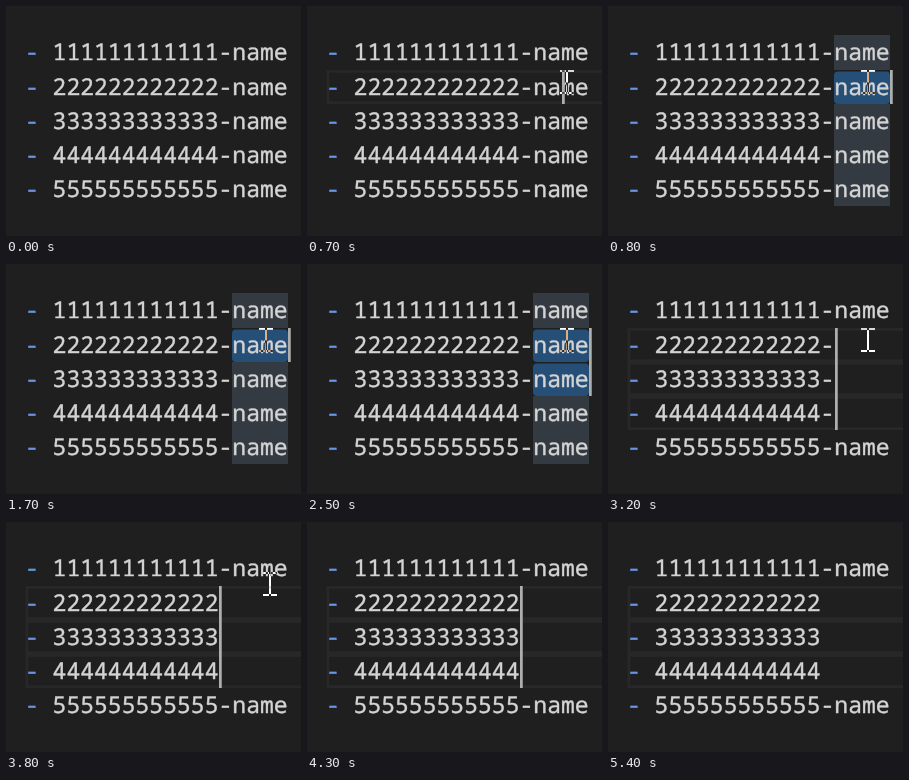
Recreate the animation shown at these times as an HTML page. Size 295 px wide and 230 px high, loop 5500 ms.

```html
<!DOCTYPE html>
<html lang="en">
<head>
<meta charset="utf-8">
<title>Multi-cursor editing</title>
<style>
  html, body { margin: 0; width: 100%; height: 100%; overflow: hidden; background: #1f1f1f; }
  svg { display: block; width: 295px; height: 230px; isolation: isolate; }
  text {
    font: 23.05px "Noto Sans Mono", "DejaVu Sans Mono", monospace;
    white-space: pre; text-rendering: geometricPrecision; stroke-width: .4;
  }
  .item { fill: #d4d4d4; stroke: #d4d4d4; }
  .bullet { fill: #6796e6; stroke: #6796e6; }
  .line { fill: none; stroke: #282828; stroke-width: 2.7; }
  .match { fill: #343a41; }
  .selection { fill: #264f78; }
  .caret { fill: #aeafad; }
  .mouse { fill: #fff; mix-blend-mode: difference; }
</style>
</head>
<body>
<svg id="stage" viewBox="0 0 295 230"></svg>
<script>
  const LOOP = 5500;
  const TICK = 100;
  const ROWS = 5;
  const WORD = 'name';
  const FULL = 15 + WORD.length;
  const stage = document.getElementById('stage');

  // The user's actions; each one updates the editor and restarts the caret blink.
  const actions = [
    { at: 0, lastRow: 0, col: 0 },
    { at: 700, lastRow: 1, col: FULL - 2 },
    { at: 800, col: FULL, selecting: true },
    { at: 2500, lastRow: 2 },
    { at: 2600, lastRow: 3 },
    { at: 3200, col: 15, selecting: false, suffix: '-' },
    { at: 3400, col: 14, suffix: '' },
    { at: 5400, blurred: true }
  ];

  const colX = col => 18.9 + col * 13.83;
  const rowY = row => Math.round(29.4 + row * 34.2);
  const clamp = p => Math.min(1, Math.max(0, p));
  const easeOut = p => 1 - (1 - p) ** 2;
  const mix = (from, to, p) => from.map((v, i) => v + (to[i] - v) * p);

  function set(el, attrs) {
    for (const key in attrs) el.setAttribute(key, attrs[key]);
  }

  function add(tag, cls, attrs) {
    const el = document.createElementNS('http://www.w3.org/2000/svg', tag);
    el.setAttribute('class', cls);
    set(el, attrs);
    stage.append(el);
    return el;
  }

  const show = (el, on) => { el.style.display = on ? '' : 'none'; };

  function addRow(i) {
    const y = rowY(i);
    const height = rowY(i + 1) - y;
    const x = Math.floor(colX(15));
    const width = Math.round(colX(FULL)) - x;
    const row = {
      line: add('rect', 'line', { x: 20.9, y: y + 1.4, width: 290, height: height - 2.7 }),
      match: add('rect', 'match', { x, y, width, height }),
      selection: add('rect', 'selection', { x, y: y + 1.4, width, height: height - 1.4, rx: 4 })
    };
    add('text', 'bullet', { x: colX(0), y: y + 25 }).textContent = '-';
    row.text = add('text', 'item', { x: colX(2), y: y + 25 });
    row.caret = add('rect', 'caret', { y, width: 2.75, height });
    return row;
  }

  const rows = Array.from({ length: ROWS }, (_, i) => addRow(i));
  const mouse = add('path', 'mouse', {
    d: 'M-7-12h6v2h-6zM1-12h6v2h-6zM-1-10h2v20h-2zM-7 10h6v2h-6zM1 10h6v2h-6z'
  });

  function mouseAt(t) {
    if (t < 300 || t >= 4300) return null;
    return t < 3800
      ? mix([275, 80], [260, 76], easeOut(clamp((t - 300) / 200)))
      : mix([264, 62], [265, 68], clamp((t - 3800) / 200));
  }

  function draw(t) {
    const now = Object.assign({ suffix: '-' + WORD }, ...actions.filter(a => a.at <= t));
    const caretOn = !now.blurred && (t - now.at) % 900 < 500;

    rows.forEach((row, i) => {
      const active = i >= 1 && i <= now.lastRow;
      row.text.textContent = String(i + 1).repeat(12) + (active ? now.suffix : '-' + WORD);
      show(row.line, active && !now.selecting);
      show(row.match, !active && now.selecting);
      show(row.selection, active && now.selecting);
      show(row.caret, active && caretOn);
      set(row.caret, { x: Math.ceil(colX(now.col)) });
    });

    const spot = mouseAt(t);
    show(mouse, spot);
    if (spot) set(mouse, { transform: `translate(${spot.map(Math.round)})` });
  }

  const begin = performance.now();
  function tick() {
    const t = (performance.now() - begin) % LOOP;
    draw(Math.floor(t / TICK) * TICK);
    requestAnimationFrame(tick);
  }
  tick();
</script>
</body>
</html>
```
